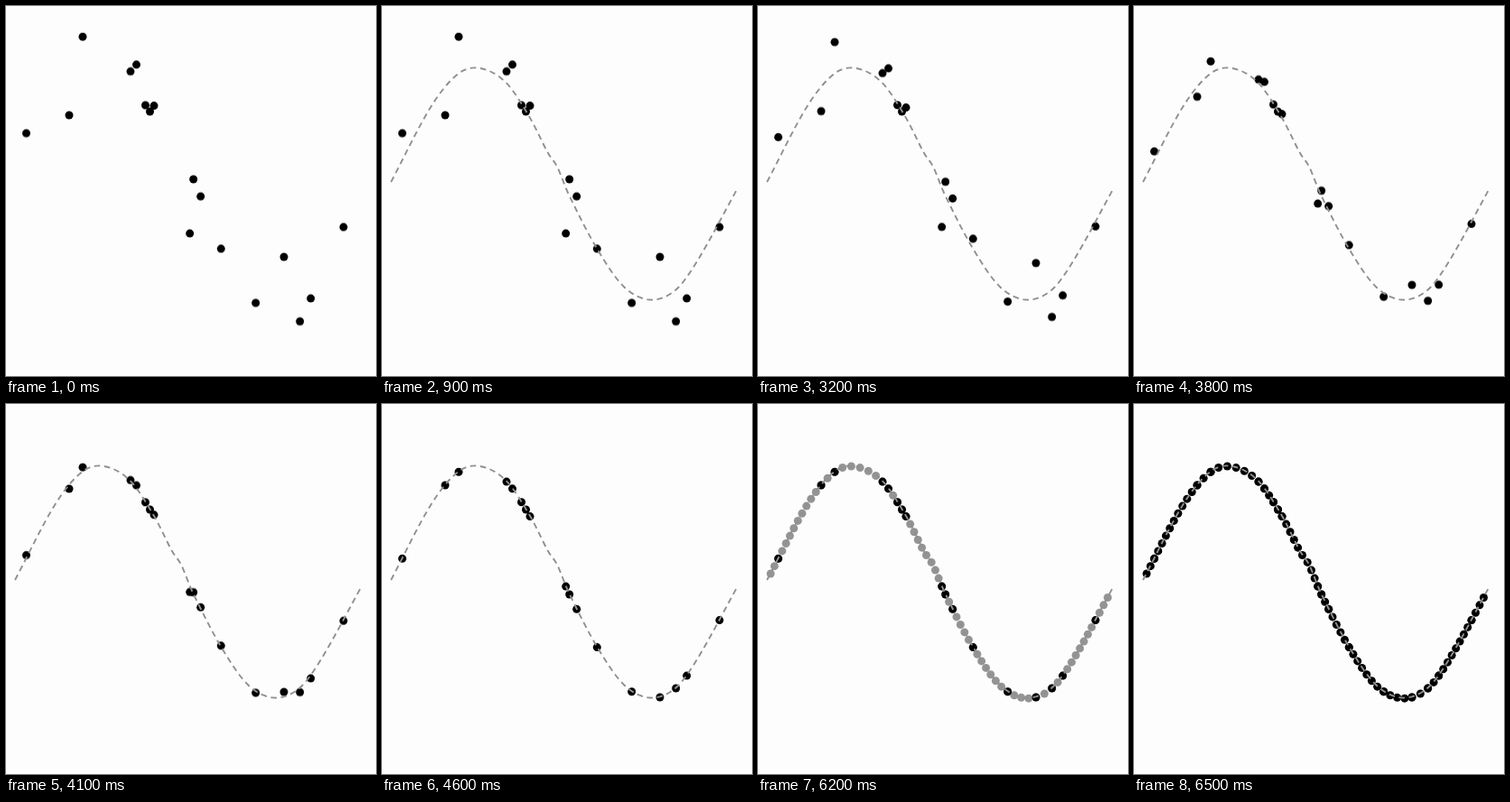
Recreate the animation shown at these times as an HTML page. Size 410 px wide and 410 px high, loop 8000 ms.

```html
<!DOCTYPE html>
<html lang="en">
<head>
<meta charset="utf-8">
<title>Points settling on a curve</title>
<style>
  html, body { margin: 0; width: 100%; height: 100%; overflow: hidden; background: #fdfdfd; }
  svg { display: block; width: 100%; height: 100%; }

  #curve {
    fill: none;
    stroke: #909090;
    stroke-width: 1.9;
    stroke-dasharray: 6.6 4.6;
    animation: show-curve 8s linear infinite;
  }
  #extra { animation: show-extra 8s linear infinite; }
  #data circle { animation: settle 8s linear infinite; }

  @keyframes show-curve {
    0%, 6.125% { opacity: 0; }
    11.25%, 100% { opacity: 1; }
  }
  @keyframes show-extra {
    0%, 74.875% { opacity: 0; }
    81.25%, 100% { opacity: 1; }
  }
  /* --rest: height above the curve at first, --from: where the slide begins */
  @keyframes settle {
    0%, 33.749% { transform: translateY(var(--rest)); }
    33.75% {
      transform: translateY(var(--from));
      animation-timing-function: cubic-bezier(.333, 0, .667, .333);
    }
    45.4375% {
      transform: translateY(calc(var(--from) / 2));
      animation-timing-function: cubic-bezier(.333, .667, .667, 1);
    }
    57.125%, 100% { transform: translateY(0px); }
  }
</style>
</head>
<body>
<svg viewBox="0 0 410 410">
  <g id="data"></g>
  <g id="extra"></g>
  <path id="curve"/>
</svg>
<script>
  const knots = [
    [10, 195], [54, 112], [84.5, 75], [109, 69], [137.5, 85], [164, 124], [184, 163],
    [194, 178], [207, 209], [238, 268.5], [268, 311], [297, 325.5], [325, 315],
    [350, 281.5], [394, 202]
  ];

  // x, resting y, and the y the slide begins at where it differs
  const points = [
    [22.5, 141], [70, 121], [85, 34], [138, 72.5], [144.5, 65], [154.5, 110],
    [159.5, 117], [164, 110.5], [203.7, 252], [207.7, 192], [215.7, 211],
    [238.3, 269, 256], [276.7, 329], [308, 278], [325.7, 349.5], [337.7, 324],
    [374, 245]
  ];

  const spacing = 9.3, firstX = 14, lastX = 387.5;

  const curve = document.getElementById('curve');
  const data = document.getElementById('data');
  const extra = document.getElementById('extra');

  function smoothPath(pts) {
    const slope = i => {
      const a = pts[Math.max(0, i - 1)], b = pts[Math.min(pts.length - 1, i + 1)];
      return (b[1] - a[1]) / (b[0] - a[0]);
    };
    let d = 'M' + pts[0];
    for (let i = 1; i < pts.length; i++) {
      const [x0, y0] = pts[i - 1], [x1, y1] = pts[i];
      const h = (x1 - x0) / 3;
      d += `C${x0 + h},${y0 + h * slope(i - 1)} ${x1 - h},${y1 - h * slope(i)} ${x1},${y1}`;
    }
    return d;
  }

  function lengthAtX(x) {
    let lo = 0, hi = curve.getTotalLength();
    for (let i = 0; i < 24; i++) {
      const mid = (lo + hi) / 2;
      if (curve.getPointAtLength(mid).x < x) lo = mid; else hi = mid;
    }
    return lo;
  }

  function dotAt(len, parent) {
    const p = curve.getPointAtLength(len);
    const c = document.createElementNS('http://www.w3.org/2000/svg', 'circle');
    c.setAttribute('cx', p.x);
    c.setAttribute('cy', p.y + 0.6);
    c.setAttribute('r', 4.5);
    parent.appendChild(c);
    return c;
  }

  curve.setAttribute('d', smoothPath(knots));

  for (const [x, rest, from = rest] of points) {
    const c = dotAt(lengthAtX(x), data);
    const y = c.getAttribute('cy');
    c.style.setProperty('--rest', rest - y + 'px');
    c.style.setProperty('--from', from - y + 'px');
  }

  // Fill each stretch between neighbouring points with evenly spaced dots
  const stops = [firstX, ...points.map(p => p[0]), lastX].map(lengthAtX);
  stops.forEach((start, i) => {
    const gap = (stops[i + 1] ?? start) - start;
    const n = Math.max(1, Math.round(gap / spacing));
    for (let k = 0; k < n; k++) dotAt(start + gap * k / n, extra);
  });
</script>
</body>
</html>
```
